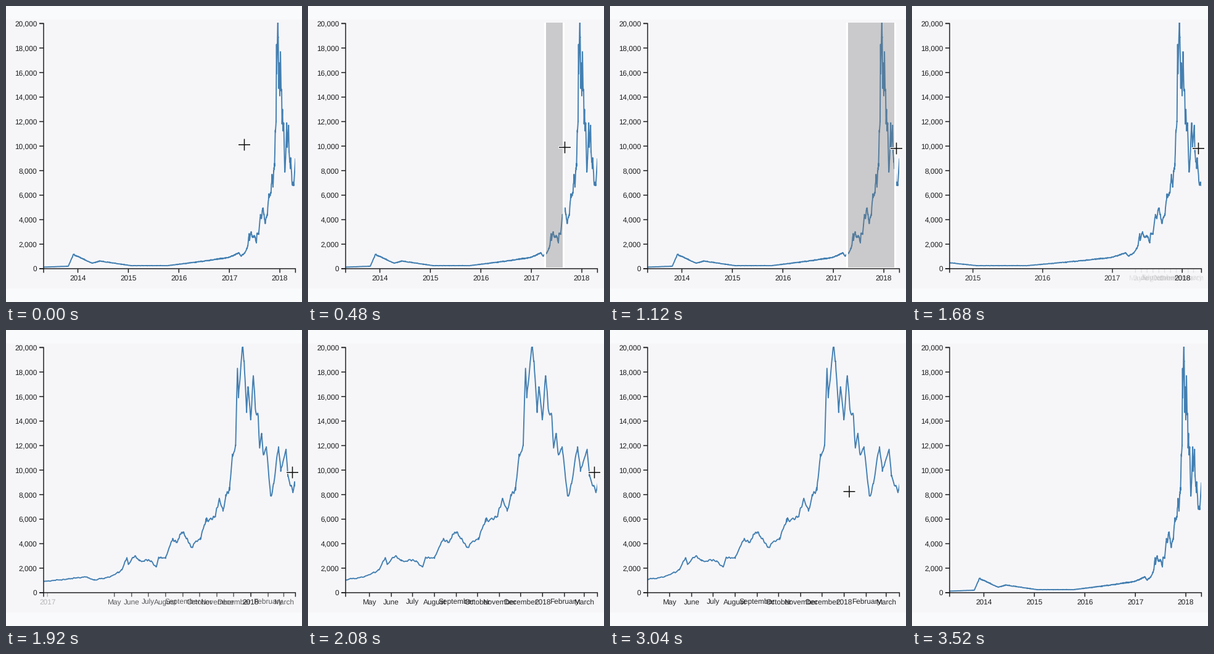
Write a matplotlib script that moves like this. It is 480x480 px and loops after 4.08 s.

```python
import matplotlib.pyplot as plt
import numpy as np
from matplotlib.animation import FuncAnimation
from matplotlib.patches import Rectangle

SIZE, DPI = 480, 100
STEP, FRAMES = 80, 51
PX = 72 / DPI
LEFT, RIGHT, TOP, BASE = 61, 469.4, 28.4, 426
INK, BLUE = "#1d1d20", "#437fb1"
FULL = (2013.322, 2018.309)
ZOOM = (2017.2688, 2018.2122)
BRUSH_X = 384.4

plt.rcParams["text.hinting"] = "none"
plt.rcParams["font.family"] = "Liberation Sans"
plt.rcParams["font.size"] = 11.9 * PX

# Turning points of the price: year, thousands
TURNS = [
    (2013.322, 0.13), (2013.81, 0.2), (2013.91, 1.15), (2014.02, 0.95),
    (2014.28, 0.45), (2014.43, 0.63), (2015.05, 0.25), (2015.78, 0.25),
    (2016.46, 0.6), (2016.97, 0.9), (2017.19, 1.28), (2017.23, 1.02),
    (2017.31, 1.3), (2017.366, 1.86), (2017.391, 2.8), (2017.398, 2.3),
    (2017.43, 3.0), (2017.452, 2.6), (2017.51, 2.6), (2017.535, 2.1),
    (2017.546, 2.85), (2017.581, 2.8), (2017.616, 4.43), (2017.632, 4.1),
    (2017.667, 4.95), (2017.706, 3.7), (2017.752, 4.48), (2017.78, 5.8),
    (2017.826, 6.2), (2017.845, 7.7), (2017.863, 6.65), (2017.877, 8),
    (2017.895, 8.35), (2017.909, 11.3), (2017.925, 12), (2017.934, 18.3),
    (2017.939, 15.9), (2017.959, 20.05), (2017.967, 18.9), (2017.979, 14.7),
    (2017.986, 16.8), (2017.999, 14.1), (2018.012, 17.7), (2018.022, 15),
    (2018.036, 14.4), (2018.043, 11.8), (2018.053, 13), (2018.06, 11.4),
    (2018.076, 11.9), (2018.097, 7.9), (2018.113, 8.9), (2018.136, 11.9),
    (2018.147, 9.9), (2018.173, 11.7), (2018.182, 9.5), (2018.207, 8.2),
    (2018.215, 9.05), (2018.243, 6.9), (2018.275, 6.9), (2018.309, 9),
]


def affine(domain):
    k = (RIGHT - LEFT) / (domain[1] - domain[0])
    return k, LEFT - k * domain[0]


VIEWS = affine(FULL), affine(ZOOM)


def to_x(t, e):
    """Stage x of date t, with e running from the full view (0) to the zoom (1)."""
    (k0, b0), (k1, b1) = VIEWS
    return (1 - e) * (k0 * t + b0) + e * (k1 * t + b1)


def to_y(price):
    return BASE - price * (BASE - TOP) / 20


def make_curve():
    """Daily prices: lines between the turning points plus seeded jitter."""
    t, price = np.array(TURNS).T
    days = np.arange(t[0], t[-1], 1 / 365)
    jitter = np.random.default_rng(4).normal(0, 1, len(days))
    jitter = np.convolve(jitter, [0.4, 0.8, 0.4], "same")
    daily = np.interp(days, t, price)
    daily += np.minimum(daily * 0.022, 0.08 + daily * 0.006) * jitter
    all_t = np.append(t, days)
    order = np.argsort(all_t)
    return all_t[order], to_y(np.append(price, daily)[order])


def ease(t):
    t = min(max(t, 0), 1)
    return 4 * t**3 if t < 0.5 else 1 - 4 * (1 - t) ** 3


def zoom_at(ms):
    if ms < 3000:
        return ease((ms - 1455) / 800)
    return 1 - ease((ms - 3000) / 200)


def cursor_at(i):
    x = np.interp(i, [1, 14, 27, 30, 40, 44], [386.5, 464.5, 464.5, 388, 388, 500])
    y = np.interp(i, [1, 8, 27, 30, 40, 44], [225, 231, 231, 262, 262, 250])
    return x, y


fig = plt.figure(figsize=(SIZE / DPI, SIZE / DPI), dpi=DPI, facecolor="#f9fafc")
ax = fig.add_axes([0, 0, 1, 1])
ax.set(xlim=(0, SIZE), ylim=(SIZE, 0))
ax.axis("off")


def stroke(xs, ys, width=1.5, color=INK, z=5):
    line, = ax.plot(xs, ys, color=color, lw=width * PX, zorder=z, snap=False,
                    solid_capstyle="butt", solid_joinstyle="miter")
    return line


ax.add_patch(Rectangle((0, 22), SIZE, 436, fc="#f6f6f9", lw=0, zorder=0))
clip = Rectangle((LEFT, 27), RIGHT - LEFT, BASE - 26.5, transform=ax.transData)

stroke([54, LEFT, LEFT, 54], [TOP, TOP, BASE, BASE])
stroke([LEFT, LEFT, RIGHT, RIGHT], [432.6, BASE, BASE, 432.6])
for k in range(0, 21, 2):
    y = to_y(k)
    stroke([54, LEFT], [y, y])
    ax.text(50.6, y + 4.2, f"{k * 1000:,}", ha="right", va="baseline", color=INK)

dates, heights = make_curve()
curve = stroke(dates, heights, 1.9, BLUE, 2)
curve.set_solid_joinstyle("round")
curve.set_clip_path(clip)

brush = Rectangle((BRUSH_X, 10), 0, 415, fc=(0.467, 0.467, 0.467, 0.34), ec="white",
                  lw=3 * PX, zorder=3)
ax.add_patch(brush)
brush.set_clip_path(clip)

ticks = []


def add_tick(label, date, kind):
    mark = stroke([0, 0], [BASE, 432.6])
    text = ax.text(0, 444.4, label, ha="center", va="baseline", color=INK, zorder=5)
    ticks.append((date, kind, mark, text))


for year in range(2014, 2018):
    add_tick(str(year), year, "year")

names = "May June July August September October November December 2018 February March"
months = np.arange("2017-05", "2018-04", dtype="datetime64[M]").astype("datetime64[D]")
for name, first in zip(names.split(), months):
    day = (first - np.datetime64("2017-01-01")).astype(int)
    add_tick(name, 2017 + day / 365, "both" if name == "2018" else "month")

halo = [stroke([], [], 4, "white", 8) for _ in range(2)]
cross = [stroke([], [], 1.6, "#111111", 9) for _ in range(2)]


def place_cross(arms, x, y, r):
    arms[0].set_data([x - r, x + r], [y, y])
    arms[1].set_data([x, x], [y - r, y + r])


def draw(i):
    e = zoom_at(i * STEP)
    curve.set_xdata(to_x(dates, e))

    fade = {"year": 1 - e, "month": e, "both": 1}
    for date, kind, mark, text in ticks:
        x, alpha = to_x(date, e), fade[kind]
        mark.set_xdata([x, x])
        text.set_x(x)
        for part in (mark, text):
            part.set_alpha(alpha)
            part.set_visible(alpha > 0.002 and -40 < x < SIZE + 40)

    cx, cy = cursor_at(i)
    brush.set_visible(1 < i < 19)
    brush.set_width(max(cx - 2.1 - BRUSH_X, 0))
    place_cross(halo, cx, cy, 10.3)
    place_cross(cross, cx, cy, 9.5)
    return []


anim = FuncAnimation(fig, draw, frames=FRAMES, interval=STEP, repeat=True,
                     repeat_delay=0, init_func=lambda: draw(0))
plt.show()
```
